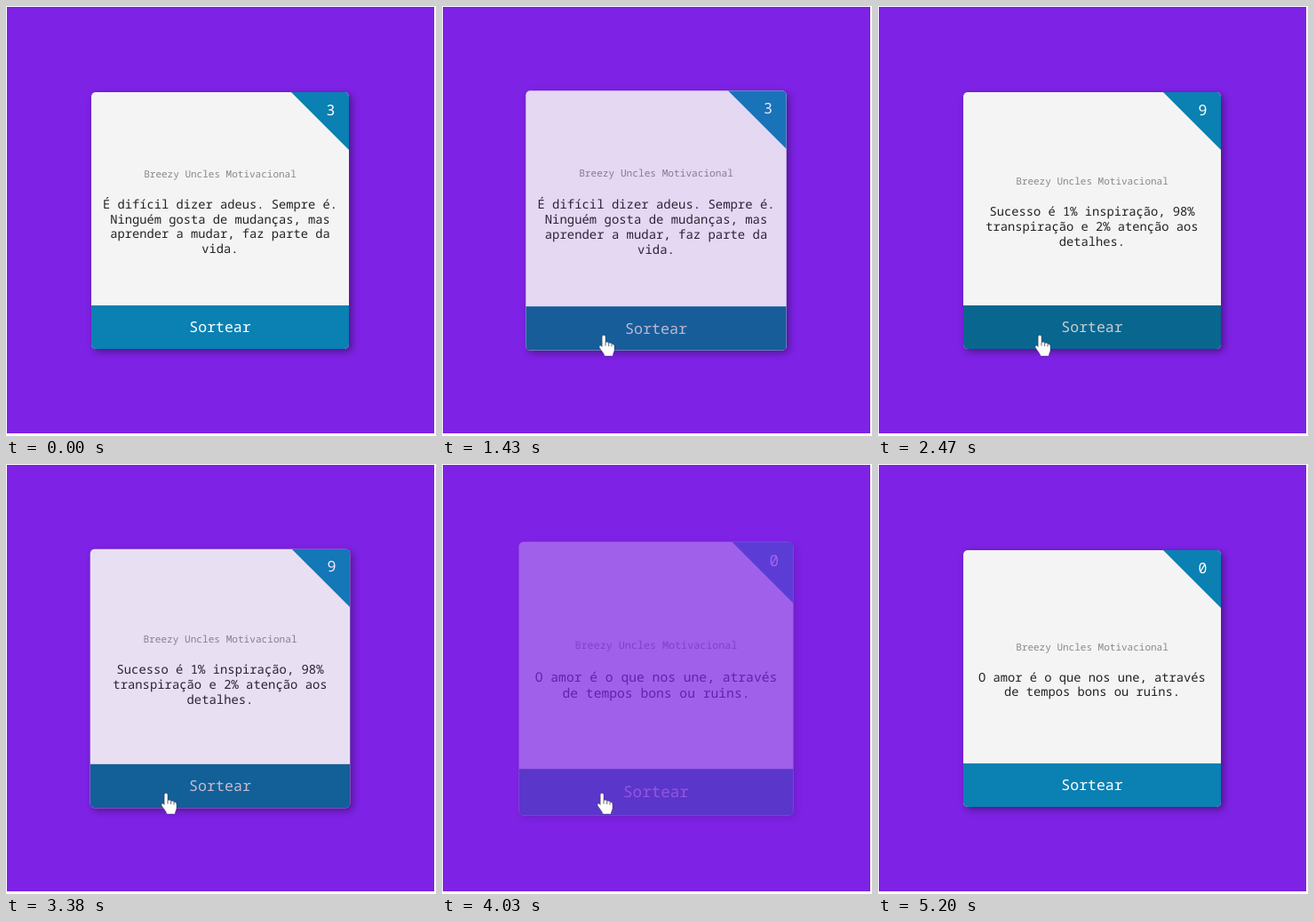
Animation of 484 by 484 pixels, one loop 5.33 s. Source, as an HTML page:

```html
<!DOCTYPE html>
<html lang="pt-BR">
<head>
<meta charset="utf-8">
<title>Sorteador de frases</title>
<style>
  html, body { margin: 0; width: 100%; height: 100%; overflow: hidden; background: #fff; }
  svg { display: block; width: 100vw; height: 100vh; }
  text {
    font-family: "Noto Sans Mono", "DejaVu Sans Mono", monospace;
    text-anchor: middle;
    text-rendering: geometricPrecision;
  }
  .shadow { filter: drop-shadow(3px 3px 4px rgba(0, 0, 0, .4)); }
  .blue { fill: #0a80b3; }
  .label { fill: #fff; font-size: 16.5px; }
  #title { fill: #888; font-size: 11px; }
  #quote { fill: #222; font-size: 13.75px; }
  #button.hover { filter: brightness(.8); }
  #cursor { fill: #fff; stroke: #222; stroke-width: .7; stroke-linejoin: round; }
</style>
</head>
<body>
<svg viewBox="0 0 484 484">
  <defs>
    <clipPath id="rounded"><rect x="96" y="97" width="290" height="289" rx="5"/></clipPath>
  </defs>
  <rect x="1" y="1" width="481" height="480" fill="#7e22e5"/>
  <g id="card">
    <rect class="shadow" x="96" y="97" width="290" height="289" rx="5" fill="#f4f4f4"/>
    <g clip-path="url(#rounded)">
      <path class="blue" d="M321 97H386V162Z"/>
      <text id="number" class="label" x="365.5" y="122.5"></text>
      <text id="title" x="241">Breezy Uncles Motivacional</text>
      <text id="quote"></text>
      <g id="button">
        <rect class="blue" x="96" y="337" width="290" height="49"/>
        <text class="label" x="241" y="367">Sortear</text>
      </g>
    </g>
  </g>
  <g id="cursor">
    <path id="arrow" d="M0 0V16L3.7 12.6 6 18.5 8.6 17.4 6.2 11.8H11.2Z"/>
    <g id="hand" transform="translate(-5 0)">
      <path stroke-opacity=".5" d="M5 0C6.2 0 7 .9 7 2V8C9 7.4 10.5 8 10.7 9C12 8.6 13.6 9 14 10C15.5 9.8 17 10.6 17 12.5V17C17 19 15.5 20 15.2 23.5H6C5.5 20 0 15 0 13C0 11.4 1.8 11 3.2 13V2C3.2 .9 4 0 5 0Z"/>
      <path fill="none" d="M7 8V12M10.7 9V12.5M14 10.5V13"/>
    </g>
  </g>
</svg>
<script>
const LOOP = 5330, STEP = 130, FADE = 500, LINE_HEIGHT = 16.7;

const cards = [
  { number: 3, lines: ["É difícil dizer adeus. Sempre é.", "Ninguém gosta de mudanças, mas", "aprender a mudar, faz parte da", "vida."] },
  { number: 9, lines: ["Sucesso é 1% inspiração, 98%", "transpiração e 2% atenção aos", "detalhes."] },
  { number: 0, lines: ["O amor é o que nos une, através", "de tempos bons ou ruins."] }
];

// Start times of each fade-out and of the fade-in that follows.
const swaps = [{ leave: 1365, enter: 1895 }, { leave: 3333, enter: 3883 }];

// Pointer tip: time, x, y
const pointerPath = [
  [130, 150, 478], [650, 178, 385], [1040, 182, 370.5], [2990, 182, 370.5],
  [3120, 180, 370.5], [4100, 180, 370.5], [4290, 135, 404], [4550, 20, 462]
];

const el = id => document.getElementById(id);
const clamp = v => Math.min(1, Math.max(0, v));
let shownCard = null;

function showCard(card) {
  if (card === shownCard) return;
  shownCard = card;
  const baseline = 228 + (4 - card.lines.length) * LINE_HEIGHT / 2;
  el("number").textContent = card.number;
  el("title").setAttribute("y", baseline - 35);
  el("quote").replaceChildren(...card.lines.map((line, i) => {
    const span = document.createElementNS("http://www.w3.org/2000/svg", "tspan");
    span.setAttribute("x", 241);
    span.setAttribute("y", baseline + i * LINE_HEIGHT);
    span.textContent = line;
    return span;
  }));
}

function opacityAt(t) {
  return swaps.reduce((opacity, { leave, enter }) =>
    opacity - clamp((t - leave) / FADE) + clamp((t - enter) / FADE), 1);
}

function pointerAt(t) {
  const next = pointerPath.findIndex(key => key[0] >= t);
  if (next < 0 || t < pointerPath[0][0]) return null;
  const [t1, x1, y1] = pointerPath[next];
  const [t0, x0, y0] = pointerPath[Math.max(0, next - 1)];
  const p = t1 > t0 ? (t - t0) / (t1 - t0) : 1;
  return [x0 + (x1 - x0) * p, y0 + (y1 - y0) * p];
}

function draw(t) {
  showCard(cards[swaps.filter(swap => t >= swap.enter).length]);

  const opacity = opacityAt(t);
  const scale = 1 + .093 * (1 - opacity);
  el("card").setAttribute("opacity", opacity);
  el("card").setAttribute("transform", `translate(241 241.5) scale(${scale}) translate(-241 -241.5)`);

  const hover = t >= 780 && t < 4420;
  el("button").classList.toggle("hover", hover);

  const tip = pointerAt(t);
  el("cursor").setAttribute("display", tip ? "inline" : "none");
  if (tip) el("cursor").setAttribute("transform", `translate(${tip})`);
  el("hand").setAttribute("display", hover ? "inline" : "none");
  el("arrow").setAttribute("display", hover ? "none" : "inline");
}

const start = performance.now();
function tick() {
  const t = (performance.now() - start) % LOOP;
  draw(Math.floor(t / STEP) * STEP);
  requestAnimationFrame(tick);
}
tick();
</script>
</body>
</html>
```
